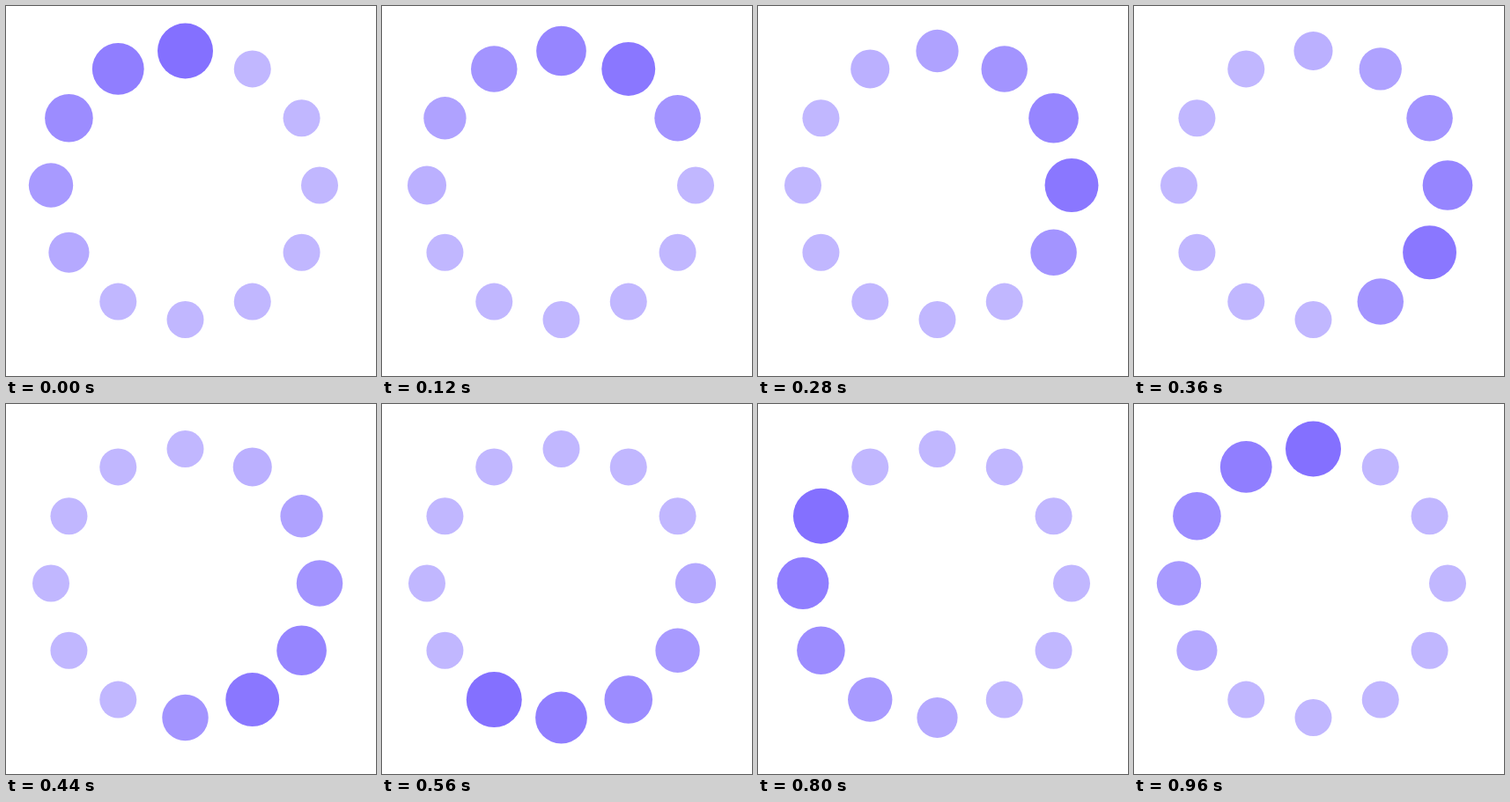
An HTML page with a canvas for the animation above (1 s loop, 420 by 420 pixels).

```html
<!DOCTYPE html>
<html lang="en">
<head>
<meta charset="utf-8">
<title>Spinner</title>
<style>
  html, body { margin: 0; width: 100%; height: 100%; overflow: hidden; background: #fff; }
  canvas { display: block; }
</style>
</head>
<body>
<canvas id="stage" width="420" height="420"></canvas>
<script>
const ctx = document.getElementById('stage').getContext('2d');
const COUNT = 12, CENTER = 203.5, RING = 152.5, DOT = 21;
const LOOP = 1000, TICK = 40, STEP = 80, FALL = 5;

// Strength 0..1 by steps since the dot's peak: linear fall, rest, one-step rise.
function pulse(age) {
  return Math.max(0, 1 - age / FALL, age - (COUNT - 1));
}

function draw(ms) {
  const head = Math.floor(ms % LOOP / TICK) * TICK / STEP;
  ctx.clearRect(0, 0, 420, 420);
  ctx.fillStyle = '#8470ff';
  for (let i = 0; i < COUNT; i++) {
    const p = pulse((head - i + COUNT) % COUNT);
    const angle = i / COUNT * 2 * Math.PI;
    ctx.globalAlpha = 0.5 + 0.5 * p;
    ctx.beginPath();
    ctx.arc(CENTER + RING * Math.sin(angle), CENTER - RING * Math.cos(angle),
      DOT * (1 + 0.5 * p), 0, 2 * Math.PI);
    ctx.fill();
  }
}

const start = performance.now();
function frame() {
  draw(performance.now() - start);
  requestAnimationFrame(frame);
}
frame();
</script>
</body>
</html>
```
